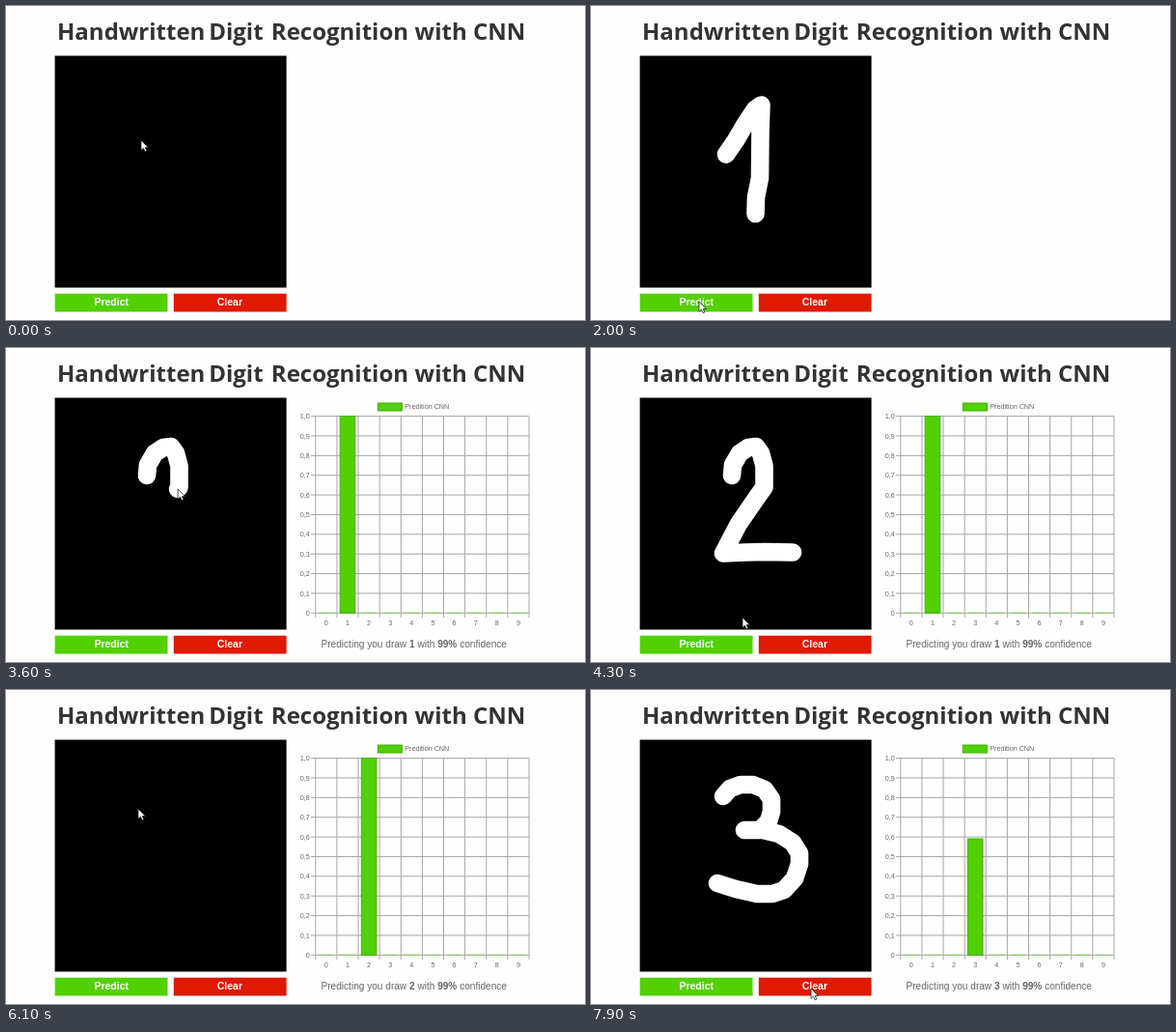
These frames come from a looping animation (600x325 px, 8 s). An HTML page:

```html
<!DOCTYPE html>
<html lang="en">
<head>
<meta charset="utf-8">
<title>Digit recognition</title>
<style>
  html, body { margin: 0; width: 100%; height: 100%; overflow: hidden; background: #fefefe; }
  svg { display: block; width: 600px; height: 325px; font-family: "Liberation Sans", Arial, sans-serif; }
  .title { font: bold 24px "Open Sans", "Noto Sans", sans-serif; fill: #333; }
  .button { font-size: 10.5px; font-weight: bold; fill: #fff; }
  .small { font-size: 7.2px; fill: #666; }
  .result { font-size: 10.1px; fill: #666; }
  .grid { stroke: #a6a6a6; }
  .bar { fill: #52d000; stroke: #43b000; }
  .ink { fill: none; stroke: #fff; stroke-width: 18.6; stroke-linecap: round; stroke-linejoin: round; }
</style>
</head>
<body>
<svg id="stage" viewBox="0 0 600 325">
  <rect width="600" height="325" fill="#fefefe"/>
  <text class="title" x="53" y="35">Handwritten <tspan x="210.2">Digit</tspan> <tspan x="274.8">Recognition</tspan> <tspan x="423.6">with</tspan> <tspan x="484">CNN</tspan></text>
  <rect x="50.6" y="51.5" width="240" height="240"/>
  <g id="inks"></g>
  <rect x="50.7" y="297.7" width="116.8" height="18.8" fill="#52d000"/>
  <rect x="173.8" y="297.7" width="116.8" height="18.8" fill="#df1a00"/>
  <g class="button" text-anchor="middle">
    <text x="109.2" y="310.3">Predict</text>
    <text x="231.9" y="310.3">Clear</text>
  </g>
  <g id="chart">
    <rect class="bar" x="385.4" y="57" width="25" height="8"/>
    <text class="small" x="413.3" y="63">Predition CNN</text>
    <g id="axes"></g>
    <rect id="bar" class="bar" width="15.6"/>
    <text class="result" x="326.5" y="310">Predicting you draw <tspan id="digit" font-weight="bold">1</tspan> with <tspan font-weight="bold">99%</tspan> confidence</text>
  </g>
  <path id="cursor" d="M0 0V10.4L2.4 8.2L4.1 11.7L5.8 11L4.2 7.5H7.4Z" fill="#fff" stroke="#222" stroke-width=".8"/>
</svg>
<script>
const LOOP = 8000, STEP = 100, GROW = 1000;
const LEFT = 320.8, TOP = 70.6, COL = 22.12, ROW = 20.37, BASE = TOP + ROW * 10;
const $ = id => document.getElementById(id);

function add(parent, tag, attrs, text = "") {
  const el = document.createElementNS("http://www.w3.org/2000/svg", tag);
  for (const key in attrs) el.setAttribute(key, attrs[key]);
  el.textContent = text;
  parent.append(el);
  return el;
}

const strokes = [
  { start: 300, end: 1300, clear: 3000,
    d: "M140 153.5L150 139L160 122L170 107L176.5 102.5L175.5 130L175 178L171 198L170.5 215" },
  { start: 3300, end: 4100, clear: 5700,
    d: "M146 132L147 121L154 109L163 103L171 102L176 109L179.5 122V144L173 153L153 182L137 212.5L160 211.5L180 211L209 211.5" },
  { start: 6200, end: 7050, clear: LOOP,
    d: "M137 110L144 102L155 98H168L180 103L187 113V126L184 136L175 145H159H178L195 149L209 158L216 169V180L211 195L200 207L188 211H172L150 206L131 200" }
];
for (const s of strokes) {
  s.el = add($("inks"), "path", { class: "ink", d: s.d });
  s.length = s.el.getTotalLength();
}

const predictions = [
  { time: 2100, digit: 1 }, { time: 4800, digit: 2 }, { time: 7700, digit: 3 }
];

// Pointer stops between strokes: time, x, y
const stops = [
  [0, 140, 139], [300, 140, 153.5],
  [1300, 170, 217], [1750, 112, 306], [2150, 112, 306], [2700, 219, 309], [3000, 219, 309], [3300, 146, 132],
  [4100, 209, 211], [4300, 157, 279], [4500, 110, 307], [4850, 110, 307], [5300, 224, 310], [5700, 224, 310],
  [6000, 139, 130], [6100, 137, 123], [6200, 137, 110],
  [7050, 131, 200], [7300, 143, 276], [7500, 112, 306], [7650, 112, 306], [7900, 228, 309], [LOOP, 228, 309]
];

function buildAxes() {
  const axes = $("axes");
  for (let i = 0; i <= 10; i++) {
    const x = LEFT + i * COL, y = BASE - i * ROW;
    add(axes, "path", { class: "grid", d: `M${x} ${TOP}V279M316 ${y}H542` });
    const value = i % 10 ? "0," + i : i ? "1,0" : "0";
    add(axes, "text", { class: "small", x: 314.8, y: y + 2.6, "text-anchor": "end" }, value);
  }
  for (let i = 0; i < 10; i++) {
    const x = LEFT + (i + .5) * COL;
    add(axes, "text", { class: "small", x, y: 287.4, "text-anchor": "middle" }, i);
    add(axes, "path", { d: `M${x - 8} ${BASE}h16`, stroke: "#86c95c" });
  }
}

function pointerAt(t) {
  const s = strokes.find(s => t >= s.start && t < s.end);
  if (s) {
    const p = s.el.getPointAtLength(s.length * (t - s.start) / (s.end - s.start));
    return [p.x, p.y];
  }
  const i = stops.findIndex(stop => stop[0] > t);
  const [t0, x0, y0] = stops[i - 1], [t1, x1, y1] = stops[i];
  const k = (t - t0) / (t1 - t0);
  return [x0 + (x1 - x0) * k, y0 + (y1 - y0) * k];
}

function render(t) {
  for (const s of strokes) {
    const k = Math.min(1, (t - s.start) / (s.end - s.start));
    s.el.style.display = k >= 0 && t < s.clear ? "" : "none";
    s.el.style.strokeDasharray = k < 1 ? `${Math.max(.01, k * s.length)} 9999` : "none";
  }

  const current = predictions.filter(p => t >= p.time).pop();
  $("chart").style.display = current ? "" : "none";
  if (current) {
    const k = Math.min(1, (t - current.time) / GROW);
    const height = (1 - (1 - k) ** 4) * (BASE - TOP);
    $("bar").setAttribute("x", LEFT + (current.digit + .5) * COL - 7.8);
    $("bar").setAttribute("y", BASE - height);
    $("bar").setAttribute("height", height);
    $("digit").textContent = current.digit;
  }

  $("cursor").setAttribute("transform", `translate(${pointerAt(t)})`);
}

function tick() {
  const t = performance.now() % LOOP;
  render(Math.floor(t / STEP) * STEP);
  requestAnimationFrame(tick);
}

buildAxes();
tick();
</script>
</body>
</html>
```
